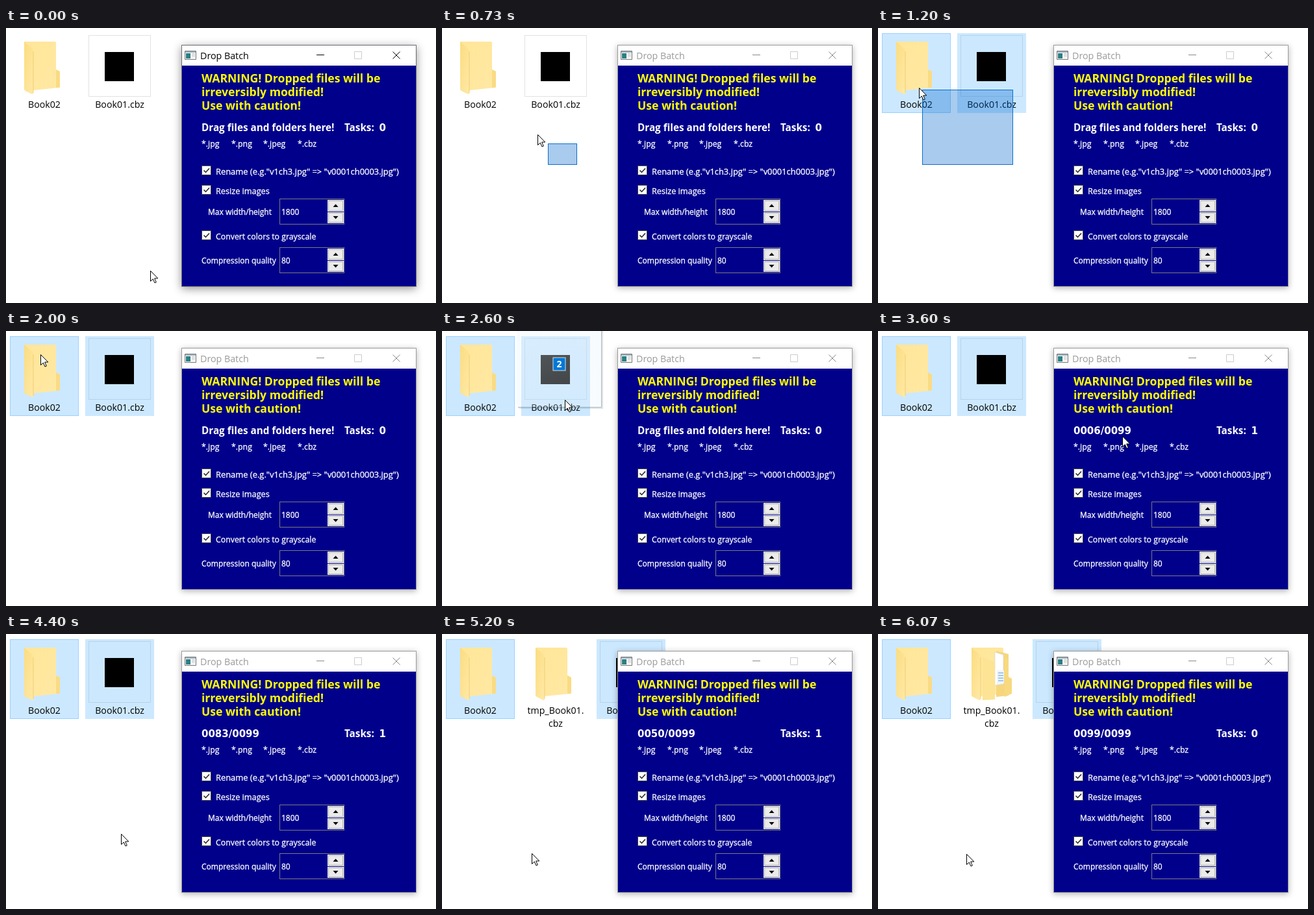
Write an HTML page that moves like this. It is 662 by 424 pixels and loops after 6.54 s.

```html
<!DOCTYPE html>
<html lang="en">
<head>
<meta charset="utf-8">
<title>Drop Batch</title>
<style>
  html, body { margin: 0; width: 100%; height: 100%; overflow: hidden; background: #fff; }
  svg { display: block; }
  text { font: 12.3px "Open Sans", "Noto Sans", sans-serif; fill: #fff; white-space: pre; }
  .plain text { stroke: #fff; stroke-width: .3px; }
  .label { font-size: 14.2px; fill: #000; text-anchor: middle; }
  .warn { font-size: 17.6px; font-weight: 700; fill: #ff0; }
  .head { font-size: 15.25px; font-weight: 700; }
  .num { font: 700 15px "DejaVu Sans", sans-serif; }
  .title { font-size: 14.25px; fill: #000; }
  .btn { fill: none; stroke: #000; }
  .frame { fill: #6c6c74; filter: drop-shadow(0 3px 7px rgba(0, 0, 0, .42)); }
  .idle .frame { fill: #9a9a9a; filter: drop-shadow(0 2px 5px rgba(0, 0, 0, .3)); }
  .idle .title { fill: #999; }
  .idle .btn { stroke: #888; }
  .thumb { fill: none; stroke: #e2e2e2; }
  .on .thumb { stroke: #b5d3ea; }
  .hl { fill: #cce8ff; visibility: hidden; }
  .on .hl { visibility: visible; }
</style>
</head>
<body>
<svg width="662" height="424" viewBox="0 0 662 424">
  <defs>
    <linearGradient id="back" x2="1" y2="1">
      <stop offset="0" stop-color="#ffe699"/><stop offset="1" stop-color="#ffe8a3"/>
    </linearGradient>
    <linearGradient id="flap" x2="1" y2="1">
      <stop offset="0" stop-color="#fbdc80"/><stop offset="1" stop-color="#ffe9a6"/>
    </linearGradient>
    <linearGradient id="glass" x2=".3" y2="1">
      <stop offset="0" stop-color="#eef6fb" stop-opacity=".4"/>
      <stop offset="1" stop-color="#e6f2fa" stop-opacity=".27"/>
    </linearGradient>
    <g id="folder">
      <path d="M28 21H75Q77 21 77 23V64L83 67V90Q83 92 81 92L42 96L28 94Z" fill="url(#back)"/>
      <path d="M77 64V92H81Q83 92 83 90V67Z" fill="#fadb83"/>
      <path d="M28 21L40 31Q42 33 42 36V100Q42 103 39 101.5L30 97Q28 96 28 94Z" fill="url(#flap)"/>
      <path d="M42 36V100" stroke="#f1cf74" fill="none"/>
    </g>
    <g id="box">
      <rect x="301.5" y=".5" width="14" height="14" fill="#fff" stroke="#444"/>
      <path d="M304.5 7.5L307.5 10.5L313 4.5" fill="none" stroke="#222" stroke-width="1.5"/>
    </g>
    <g id="spin">
      <rect x="421.5" y=".5" width="99" height="39" fill="none" stroke="#7a7a7a"/>
      <path d="M495 2H520V20H495ZM495 21H520V38H495Z" fill="#f0f0f0"/>
      <path d="M496.5 3.5H518.5V18.5H496.5ZM496.5 22.5H518.5V36.5H496.5Z" fill="#ebebeb" stroke="#b4b4b4"/>
      <path d="M503.5 13H511.5L507.5 8.5ZM503.5 27H511.5L507.5 31.5Z"/>
    </g>
  </defs>

  <g id="book02">
    <rect class="hl" x="6.5" y="8.5" width="105" height="122" stroke="#99d1ff"/>
    <use href="#folder"/>
    <text class="label" x="59" y="123">Book02</text>
  </g>

  <g id="temp">
    <use href="#folder" x="116"/>
    <g id="pages">
      <path d="M182 26L201 31V95L182 97Z" fill="#f6d67d"/>
      <path d="M180 28L193 32V77L180 79Z" fill="#fff" stroke="#d8d8d8" stroke-width=".7"/>
      <path d="M183 56H194V76L183 78Z" fill="#eef5fb"/>
      <path d="M185 60H193M185 64H193M185 68H193M185 72H193" stroke="#5b9bd1"/>
      <path d="M195 36L201 38V66L206 69V92L195 97Z" fill="#f8d97f"/>
      <path d="M161 36L180 43V101L161 102Z" fill="#fde394"/>
    </g>
    <text class="label" x="175" y="123">tmp_Book01.</text>
    <text class="label" x="175" y="143">cbz</text>
  </g>

  <g id="book01">
    <rect class="hl" x="122" y="8" width="106" height="123"/>
    <rect class="thumb" x="127.5" y="11.5" width="95" height="94"/>
    <rect x="152" y="37" width="45" height="45"/>
    <text class="label" x="175" y="123">Book01.cbz</text>
  </g>

  <rect id="lasso" fill="#0066cc" fill-opacity=".34" stroke="#0a6fcb"/>

  <g id="win">
    <rect class="frame" x="270" y="26" width="362" height="373"/>
    <path d="M271 27H631V58H271Z" fill="#fff"/>
    <path d="M271 58H631V398H271Z" fill="#00008b"/>
    <path d="M275.5 35.5H292.5V48.5H275.5Z" fill="#f4f4f4" stroke="#777"/>
    <path d="M276 36H292V38H276Z" fill="#9db4c4"/>
    <path d="M277 39H284V47H277Z" fill="#2c7f83"/>
    <path d="M286 40H291M286 43H291" stroke="#bbb"/>
    <text class="title" x="299" y="48">Drop Batch</text>
    <path class="btn" d="M478 41.5H490"/>
    <path d="M536.5 36.5H547.5V47.5H536.5Z" fill="none" stroke="#ccc"/>
    <path class="btn" d="M595.5 36.5L606.5 47.5M606.5 36.5L595.5 47.5"/>
    <text class="warn" x="301" y="84">WARNING! Dropped files will be</text>
    <text class="warn" x="301" y="105">irreversibly modified!</text>
    <text class="warn" x="301" y="126">Use with caution!</text>
    <text class="head" id="prompt" x="301" y="159">Drag files and folders here!</text>
    <text class="num" id="count" x="301" y="159"></text>
    <text class="head" x="521" y="159">Tasks:</text>
    <text class="num" id="tasks" x="574.5" y="159">0</text>
    <g class="plain">
      <text x="301" y="183">*.jpg</text>
      <text x="347" y="183">*.png</text>
      <text x="396" y="183">*.jpeg</text>
      <text x="449" y="183">*.cbz</text>
      <text x="323" y="226" style="font-size:12.9px">Rename (e.g."v1ch3.jpg" =&gt; "v0001ch0003.jpg")</text>
      <text x="323" y="256" style="font-size:12.7px">Resize images</text>
      <text x="311" y="288" style="font-size:12px">Max width/height</text>
      <text x="424" y="288" style="font-size:12px">1800</text>
      <text x="323" y="326">Convert colors to grayscale</text>
      <text x="301" y="363" style="font-size:12px">Compression quality</text>
      <text x="424" y="363" style="font-size:12px">80</text>
    </g>
    <use href="#box" y="212"/>
    <use href="#box" y="242"/>
    <use href="#box" y="312"/>
    <use href="#spin" y="263"/>
    <use href="#spin" y="338"/>
  </g>

  <g id="ghost">
    <path d="M130.5 3V130.5H2" fill="none" stroke="#3c5566" stroke-opacity=".4"/>
    <path d="M131.5 4V131.5H3M132.5 5V132.5H4" fill="none" stroke="#3c5566" stroke-opacity=".16"/>
    <rect width="130" height="130" rx="2" fill="url(#glass)"/>
    <rect x="56" y="54" width="19" height="20" fill="#0078d7" stroke="#fff" stroke-opacity=".8"/>
    <text x="65.5" y="69" text-anchor="middle" style="font-size:14px;font-weight:700">2</text>
  </g>

  <g id="tip">
    <rect x="12.5" y="15.5" width="75" height="23" fill="#fff" stroke="#cfcfcf"/>
    <path d="M18 27.5H32M25 20.5V34.5" stroke="#1f4fb5" stroke-width="2"/>
    <text x="37" y="33" style="font-size:14.6px;fill:#1b3aa3">Kopiuj</text>
  </g>

  <path id="cursor" d="M.5 .5V16.5L4.3 13L7 19L9.3 18L6.7 12H11.8Z" fill="#fff" stroke="#000"/>
</svg>
<script>
const LOOP = 6540, LAST = 91;
const PRESS = 6, RELEASE = 24, LIFT = 31, DROP = 52, UNPACK = 73, FILLED = 83, DONE = 84;

// Pointer path: step, x, y
const path = [
  [0, 222, 374], [1, 222, 374], [6, 208, 211], [10, 163, 178], [15, 84, 109],
  [17, 68, 95], [18, 63, 92], [20, 50, 80], [23, 34, 62], [26, 31, 28],
  [28, 44, 24], [30, 53, 36], [31, 62, 42], [35, 250, 117], [38, 175, 102],
  [39, 189, 106], [40, 180, 108], [42, 132, 112], [46, 364, 144], [47, 364, 144],
  [50, 418, 149], [52, 410, 149], [60, 274, 201], [66, 177, 308], [68, 152, 344],
  [70, 138, 338], [81, 138, 338], [83, 136, 339], [91, 136, 339]
];

const el = {};
for (const node of document.querySelectorAll("svg > [id], text[id], #pages")) el[node.id] = node;

function pointer(n) {
  const i = Math.max(1, path.findIndex(p => p[0] >= n));
  const [a, x0, y0] = path[i - 1], [b, x1, y1] = path[i];
  const k = Math.max(0, (n - a) / (b - a));
  return [Math.round(x0 + (x1 - x0) * k), Math.round(y0 + (y1 - y0) * k)];
}

const show = (node, on) => node.setAttribute("visibility", on ? "visible" : "hidden");
const move = (node, x, y) => node.setAttribute("transform", `translate(${x} ${y})`);

function setLasso(n) {
  const [x, y] = pointer(n - 1), [px, py] = pointer(PRESS);
  const attrs = { x: x + .5, y: y + .5, width: Math.max(0, px - x - 1), height: Math.max(0, py - y - 1) };
  for (const key in attrs) el.lasso.setAttribute(key, attrs[key]);
  return [x, y];
}

function progress(n) {
  if (n <= DROP) return "";
  let done = Math.min(99, Math.round((n - 53) * 83 / 13));
  if (n >= UNPACK) done = Math.min(98, Math.round((n - 70) * 6.2));
  if (n >= 90) done = 99;
  return String(done).padStart(4, "0") + "/0099";
}

function draw(n) {
  const [x, y] = pointer(n), [px, py] = pointer(n - 1);
  move(el.cursor, x, y);
  el.win.classList.toggle("idle", n >= PRESS);

  const selecting = n > PRESS && n < RELEASE;
  const [lx, ly] = setLasso(Math.max(PRESS, Math.min(n, RELEASE)));
  show(el.lasso, selecting);
  el.book01.classList.toggle("on", n > PRESS && lx < 228 && ly < 131);
  el.book02.classList.toggle("on", n > PRESS && lx < 112 && ly < 131);

  const dragging = n >= LIFT && n < DROP;
  show(el.ghost, dragging);
  move(el.ghost, Math.round((x + px) / 2) - 67, Math.round((y + py) / 2) - 117);
  show(el.tip, dragging && x >= 271 && y >= 27);
  move(el.tip, x, y);

  show(el.prompt, n <= DROP);
  el.count.textContent = progress(n);
  el.tasks.textContent = n >= DROP && n < DONE ? 1 : 0;

  show(el.temp, n >= UNPACK);
  show(el.pages, n >= FILLED);
  move(el.book01, n >= UNPACK ? 116 : 0, 0);
}

const start = performance.now();
function tick() {
  const t = (performance.now() - start) % LOOP;
  draw(Math.min(LAST, Math.floor((t + 5) * .015)));
  requestAnimationFrame(tick);
}
tick();
</script>
</body>
</html>
```
